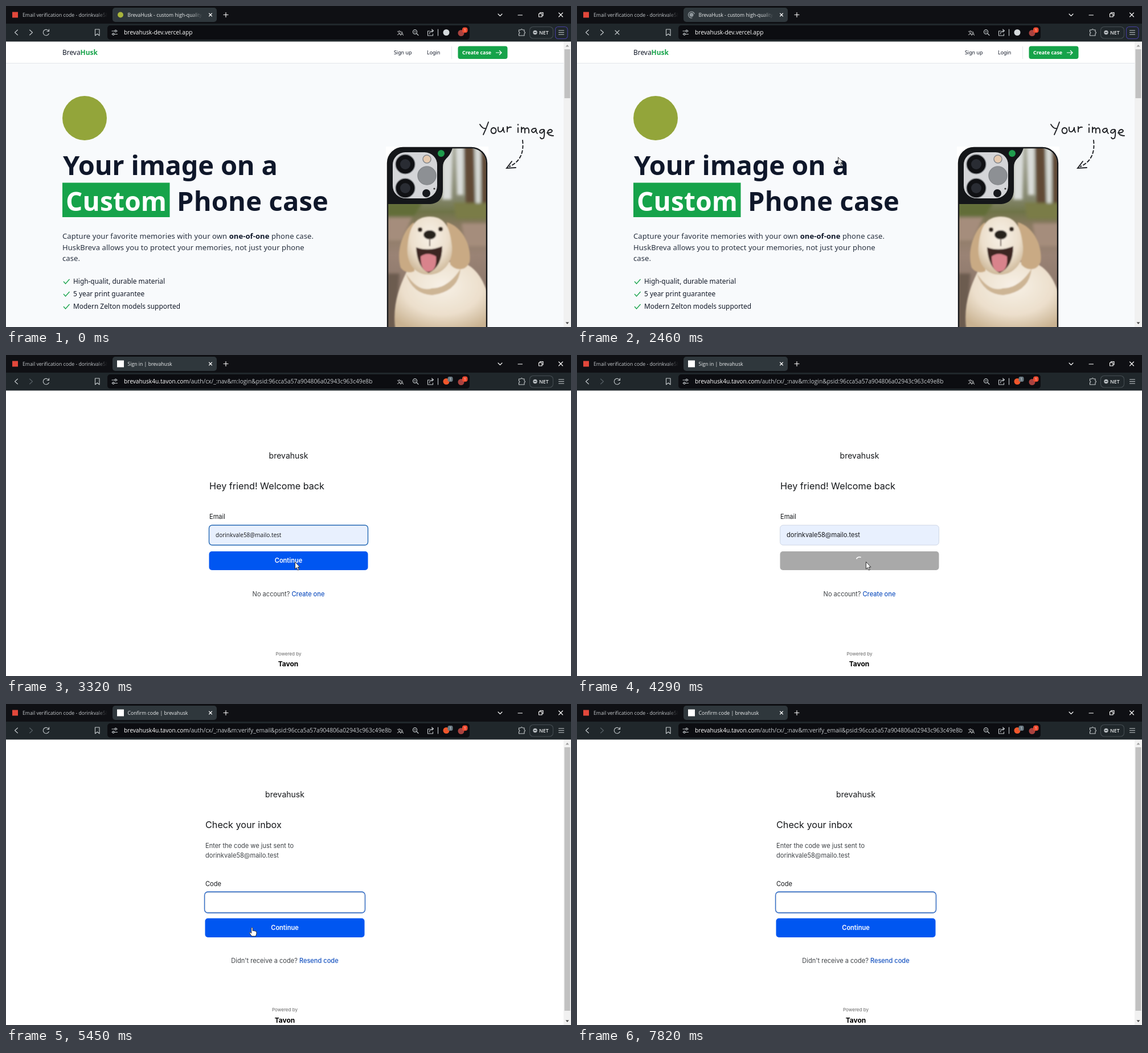
Write an HTML page that moves like this. It is 992x564 px and loops after 7990 ms.

```html
<!DOCTYPE html>
<html lang="en">
<head>
<meta charset="utf-8">
<title>Sign-in walkthrough</title>
<style>
html, body { margin: 0; width: 100%; height: 100%; overflow: hidden; background: #fff; }
svg { display: block; }
text { white-space: pre; }
.ui { font-family: "Open Sans", "Noto Sans", sans-serif; font-size: 8.7px; fill: #eceeef; }
.url { font-size: 10.2px; fill: #fff; }
.dim { fill: #c6cacd; }
.icon { fill: none; stroke: #c6cbce; stroke-width: 1.1; stroke-linecap: round; stroke-linejoin: round; }
.shop { font-family: "Noto Sans", sans-serif; font-size: 11.9px; fill: #111827; }
.big { font-size: 47px; font-weight: 700; letter-spacing: -.2px; fill: #0f172a; }
.lead { font-size: 13px; letter-spacing: .08px; fill: #27303f; }
.nav { font-size: 8.9px; }
.form { font-family: Inter, sans-serif; font-size: 11.05px; fill: #15171a; }
.form .mid { text-anchor: middle; }
.form .head { font-size: 16.2px; }
.form .soft { fill: #3f4347; }
.form .link { fill: #1552c0; font-weight: 500; }
.form .cta { fill: #fff; font-weight: 600; }
.form .tiny { font-size: 8.1px; fill: #666; }
.form .maker { font-size: 12px; font-weight: 700; fill: #000; }
</style>
</head>
<body>
<svg width="992" height="564" viewBox="0 0 992 564">
  <defs>
    <linearGradient id="fade1"><stop stop-color="#0f1014" stop-opacity="0"/><stop offset="1" stop-color="#0f1014"/></linearGradient>
    <linearGradient id="fade2"><stop stop-color="#2f373c" stop-opacity="0"/><stop offset="1" stop-color="#2f373c"/></linearGradient>
    <linearGradient id="wood" x2="0" y2="1">
      <stop stop-color="#a9aa9c"/><stop offset=".28" stop-color="#85876f"/><stop offset=".36" stop-color="#6f7448"/>
      <stop offset=".44" stop-color="#8b7a63"/><stop offset=".6" stop-color="#9a8375"/><stop offset="1" stop-color="#7c6a5e"/>
    </linearGradient>
    <radialGradient id="fur" cx=".5" cy=".35" r=".7">
      <stop stop-color="#f7f0e6"/><stop offset=".6" stop-color="#ecdfcc"/><stop offset="1" stop-color="#c9b291"/>
    </radialGradient>
    <clipPath id="case"><path d="M671 570V276a26 26 0 0 1 26-26h120a26 26 0 0 1 26 26V570z"/></clipPath>
    <filter id="blur"><feGaussianBlur stdDeviation="2.500"/></filter>
    <filter id="soft"><feGaussianBlur stdDeviation="1"/></filter>
  </defs>

  <rect y="62" width="992" height="502" fill="#fff"/>

  <!-- shop page -->
  <g id="shop" class="shop">
    <rect y="101" width="979" height="463" fill="#f8fafc"/>
    <path d="M0 100.5H979M782.5 71V93" stroke="#e3e6ea"/>
    <text x="99" y="85.500" font-weight="500">Breva<tspan font-weight="700" fill="#16a34a">Husk</tspan></text>
    <text class="nav" x="681" y="84.500">Sign up</text>
    <text class="nav" x="739" y="84.500">Login</text>
    <rect x="793.500" y="70.500" width="87" height="22.500" rx="4" fill="#16a34a"/>
    <text class="nav" x="801" y="84.500" style="fill:#fff;font-weight:600">Create case</text>
    <path d="M860 82h10m-4-4 4 4-4 4" fill="none" stroke="#fff" stroke-width="1.200"/>

    <circle cx="138" cy="197" r="39" fill="#93a53a"/>
    <text class="big" x="100" y="297">Your image on a</text>
    <rect x="99" y="310.500" width="188.500" height="60.500" fill="#16a34a"/>
    <text class="big" x="105" y="360" style="fill:#fff;font-size:46px;letter-spacing:.2px">Custom</text>
    <text class="big" x="300" y="360" style="letter-spacing:.2px">Phone case</text>
    <text class="lead" x="99" y="408.500">Capture your favorite memories with your own <tspan font-weight="600" fill="#0f172a">one-of-one</tspan> phone case.</text>
    <text class="lead" x="99" y="428.500">HuskBreva allows you to protect your memories, not just your phone</text>
    <text class="lead" x="99" y="448">case.</text>
    <path d="M101 484l3.500 4 7-8M101 506l3.500 4 7-8M101 528l3.500 4 7-8" fill="none" stroke="#16a34a" stroke-width="1.300"/>
    <text x="118" y="487.500">High-qualit, durable material</text>
    <text x="118" y="509.500">5 year print guarantee</text>
    <text x="118" y="531.500">Modern Zelton models supported</text>

    <rect x="667" y="247" width="180" height="317" fill="#fff"/>
    <g clip-path="url(#case)">
      <rect x="669" y="248" width="178" height="316" fill="url(#wood)"/>
      <g filter="url(#blur)">
        <path d="M766 248h18l-2 92h-16zM790 248h13v84h-11zM824 248h9v98h-8z" fill="#d9dcd9"/>
        <path d="M804 246h17l3 124h-16zM834 246h12v120h-10z" fill="#614936"/>
        <path d="M669 346h62l-14 22h-48z" fill="#626d37"/>
        <path d="M786 346h60v28h-56z" fill="#7a7c46"/>
        <path d="M669 372h44l-18 40h-26zM800 382h46v40h-40z" fill="#a58d7c"/>
        <path d="M669 470h22l-8 100h-14z" fill="#6c5b50"/>
      </g>
      <g filter="url(#soft)">
        <path d="M684 570C676 520 696 480 712 450h88c30 10 42 40 50 70v50z" fill="url(#fur)"/>
        <path d="M702 470q22 34 46 26 28 0 50-34-4 40-50 46-34-2-46-38z" fill="#cdb595"/>
        <path d="M716 380C698 392 684 430 693 460q10 12 24 6zM774 380c28 8 44 42 40 70-8 18-26 14-34 4z" fill="#c9aa84"/>
        <path d="M744 370c28 0 36 22 39 52 2 30-16 50-41 50s-40-22-37-50c3-32 12-52 39-52z" fill="url(#fur)"/>
        <path d="M720 424q22 8 46-2 0 36-24 47-20-10-22-45z" fill="#3d2623"/>
        <path d="M728 440q12-9 27 0 2 26-14 27-13-2-13-27z" fill="#d9838c"/>
        <ellipse cx="744" cy="402" rx="11" ry="8" fill="#28211f"/>
        <path d="M744 408v14" stroke="#5d4a40" stroke-width="2"/>
        <circle cx="727" cy="393" r="4" fill="#33251d"/><circle cx="763" cy="392" r="4" fill="#33251d"/>
      </g>
    </g>
    <path d="M670 570V276a27 27 0 0 1 27-27h120a27 27 0 0 1 27 27V570" fill="none" stroke="#15171a" stroke-width="2.400"/>
    <path d="M670 348V276a27 27 0 0 1 27-27h87q-3 12-11 19-6 6-6 15v39q0 26-26 26z" fill="#141619"/>
    <rect x="679" y="257" width="78" height="81" rx="22" fill="#d4d5d8"/>
    <g stroke="#85888c" stroke-width="1.500">
      <circle cx="701" cy="278" r="17" fill="#101114"/><circle cx="701" cy="320" r="17" fill="#101114"/>
      <circle cx="739" cy="298" r="16" fill="#8d9094"/><circle cx="739" cy="269" r="7" fill="#e5c9ae"/>
    </g>
    <g fill="#292c33"><circle cx="701" cy="278" r="9"/><circle cx="701" cy="320" r="9"/></g>
    <circle cx="738" cy="329" r="7" fill="#17191d"/><circle cx="752" cy="321" r="1.600" fill="#333"/>
    <circle cx="764" cy="259" r="6" fill="#1f9d4d"/>

    <g fill="none" stroke="#202226" stroke-width="1.900" stroke-linecap="round">
      <path d="M832 208q5 8 9 7M847 204q-4 12-9 22M856 214a4.500 5 0 1 0 .1 0M864 213q-1 9 4 8 4-1 5-8 0 6 2 9M880 212v9m0-5q3-4 7-3"/>
      <path d="M899 214v8m0-14v1M905 222v-9m0 4q4-6 6 0v6m0-6q5-6 7 1v5M930 215q-8 0-7 5 4 6 8-4-1 6 2 8"/>
      <path d="M944 217q-7-1-7 5 5 4 8-5 1 9-1 15-4 3-6-1M950 223q9 0 9-4-3-4-7 0-4 8 9 9"/>
      <path d="M907 236Q911 270 884 282" stroke-dasharray="5 4"/><path d="M888 273l-9 12 16-1"/>
    </g>
  </g>

  <!-- sign-in page -->
  <g id="login" class="form">
    <text class="mid" x="496" y="182" style="font-size:14px">brevahusk</text>
    <text class="head" x="357" y="236">Hey friend! Welcome back</text>
    <text x="357" y="288">Email</text>
    <rect id="field" x="356.500" y="299" width="279" height="35" rx="5.500"/>
    <text id="mail" x="368" y="320">dorinkvale58@mailo.test</text>
    <path id="caret1" d="M368.500 311V322" stroke="#111"/>
    <rect id="button" x="356.500" y="345" width="279" height="33" rx="5"/>
    <text id="go" class="mid cta" x="496" y="365">Continue</text>
    <path id="spin" d="M490 361a6 6 0 0 1 6-6" fill="none" stroke="#fff" stroke-width="1.600"/>
    <text class="mid soft" x="496" y="424">No account? <tspan class="link">Create one</tspan></text>
    <text class="mid tiny" x="496" y="527.500">Powered by</text>
    <text class="mid maker" x="495.500" y="546.500">Tavon</text>
  </g>

  <!-- code page -->
  <g id="code" class="form">
    <text class="mid" x="489.500" y="163.500" style="font-size:14px">brevahusk</text>
    <text class="head" x="350" y="217.500">Check your inbox</text>
    <text class="soft" x="350" y="253">Enter the code we just sent to</text>
    <text class="soft" x="350" y="270">dorinkvale58@mailo.test</text>
    <text x="350" y="320">Code</text>
    <rect x="348.500" y="330" width="282" height="37" rx="6" fill="#fff" stroke="#1f5fc0" stroke-width="1.300"/>
    <rect x="350" y="331.500" width="279" height="34" rx="5" fill="none" stroke="#d3d7de" stroke-width=".8"/>
    <path id="caret2" d="M362.500 342.500V354" stroke="#111"/>
    <rect x="349.500" y="376.500" width="280" height="33.500" rx="5" fill="#0056f1"/>
    <text class="mid cta" x="489.500" y="397">Continue</text>
    <text class="mid soft" x="489.500" y="455">Didn't receive a code? <tspan class="link">Resend code</tspan></text>
    <text class="mid tiny" x="489.500" y="540">Powered by</text>
    <text class="mid maker" x="489.500" y="559.500">Tavon</text>
  </g>

  <g id="bar">
    <rect x="979" y="62" width="13" height="502" fill="#f1f1f1"/>
    <rect id="thumb" x="980.500" y="76" width="10" height="86" fill="#c1c1c1"/>
    <path d="M982.500 71.500h6l-3-3.500z" fill="#999"/><path d="M982.500 555.500h6l-3 3.500z" fill="#444"/>
  </g>

  <!-- browser frame -->
  <g class="ui">
    <rect width="992" height="31" fill="#0f1014"/>
    <rect y="31" width="992" height="31.500" fill="#20272b"/>
    <rect x="187" y="3" width="183" height="25" rx="5" fill="#2f373c"/>
    <rect x="178" y="34" width="636" height="25" rx="5" fill="#0c0d11"/>
    <rect x="11" y="10.500" width="10" height="10" fill="#e2483b"/>
    <text x="29" y="18.500" class="dim">Email verification code - dorinkvale58</text>
    <rect x="158" y="8" width="20" height="16" fill="url(#fade1)"/><rect x="178" y="8" width="9" height="16" fill="#0f1014"/>
    <circle id="favShop" cx="201" cy="15.500" r="5" fill="#a8b43c"/>
    <g id="favLoad" fill="none"><circle cx="201" cy="15.500" r="3.500" fill="#8f979c"/><path id="ring" d="M201 10a5.500 5.500 0 1 1-5.500 5.500" stroke="#a9b0b5"/></g>
    <rect id="favForm" x="195" y="9.500" width="12" height="12" fill="#fff"/>
    <text id="title" x="213.500" y="18.500"></text>
    <rect x="325" y="8" width="20" height="16" fill="url(#fade2)"/><rect x="345" y="8" width="8" height="16" fill="#2f373c"/>

    <g class="icon">
      <path stroke="#fff" d="M356.500 13l5 5m0-5-5 5M382 15.500h8m-4-4v8M864 14l3.500 3.500L871 14M899 16h7.500M935.500 13.500h5.500v5.500h-5.500zM937.500 13.500v-2h5.500v5.500h-2M970.500 12l7 7m0-7-7 7"/>
      <path d="M20.500 42l-5 4.500 5 4.500"/>
      <path id="fwd" d="M41.500 42l5 4.500-5 4.500"/>
      <path id="reload" d="M75 44a5.200 5.200 0 1 0 .3 4.500M75.500 41v3.500H72"/>
      <path id="stop" d="M67 43l7 7m0-7-7 7"/>
      <path d="M156.500 41h7.500v11l-3.700-3-3.800 3zM186 44h4m5 0h.5M186 49.500h.5m4 0h5"/>
      <circle cx="192.500" cy="44" r="1.600"/><circle cx="188.500" cy="49.500" r="1.600"/>
      <circle cx="718" cy="45.500" r="3.600"/><path d="M721 48.500l3 3M716.500 45.500h3M758.500 41v11"/>
      <path d="M744 44h-3.500v8h9v-3M743.500 49q.5-5 6.500-5.500m-2.500-2.500 3 2.500-3 2.500"/>
      <path d="M900.500 42h3.500q1-3 3 0h3v3.500q3 1 0 3V52h-9.500v-3.500q3-1.500 0-3z"/>
      <rect x="919.500" y="36.500" width="41" height="20.500" rx="6" stroke="#444c51"/>
      <path d="M970.500 43h9m-9 3.500h9m-9 3.500h9"/>
      <rect id="menu" x="964.500" y="36.500" width="21.500" height="21" rx="5" stroke="#463fa0"/>
    </g>
    <g id="lang"><text x="686.500" y="49.500" style="font-family:'Noto Sans CJK SC','Noto Sans CJK JP',sans-serif;font-size:8px">文</text><text x="692.500" y="52" style="font-size:8.500px">A</text></g>
    <circle id="shield" cx="773" cy="46.500" r="5.500"/>
    <g id="count"><rect x="775.500" y="38" width="9" height="9" rx="3" fill="#687780"/><text x="778.200" y="45" style="font-size:6.500px">1</text></g>
    <circle cx="799" cy="47.500" r="5.500" fill="#a8423f"/>
    <rect x="801" y="37.500" width="9.500" height="9.500" rx="4" fill="#ee4b31"/><text x="804" y="45" style="font-size:6.500px;fill:#fff">1</text>
    <circle cx="929" cy="46.500" r="3.700" fill="#b7bcc0"/><path d="M927 46.500h4" stroke="#20272b"/>
    <text x="936" y="49.700" style="font-weight:600">NET</text>
    <text class="url" x="207" y="50.300"><tspan id="host"></tspan><tspan id="path" class="dim"></tspan></text>
  </g>

  <g id="cursor" stroke="#222" stroke-width=".9" fill="#fff" stroke-linejoin="round">
    <path id="arrow" d="M.5.500V13l2.800-2.600 2 4.700 2-.9-2-4.500h3.700z"/>
    <path id="hand" d="M-1.200 1.500q1.200-2 2.400 0V6.500l1.500-.3 1.800.6 1.700.4q1.700 0 1.700 2v2.300l-1.300 4.500H-.5L-4.300 10.500q0-2 1.600-1.200l1.500 1.400z"/>
  </g>
</svg>
<script>
const LOOP = 7990, OPEN = 2540, READY = 2900, CODE = 4800;
const $ = id => document.getElementById(id);
const show = (id, on) => $(id).style.display = on ? "" : "none";
const within = (v, a, b) => v >= a && v < b;
const put = (id, attrs) => { for (const k in attrs) $(id).setAttribute(k, attrs[k]); };

// pointer path: time, x, y
const path = [
  [170, 560, 560], [950, 617, 150], [1420, 769, 97], [1570, 750, 82], [1730, 750, 82],
  [2100, 620, 300], [2540, 443, 262], [3080, 507, 363], [4290, 507, 363], [4700, 540, 330],
  [5080, 672, 182], [5250, 540, 290], [5450, 432, 392], [5560, 288, 420], [5740, 420, 490],
  [5910, 572, 516], [6380, 583, 530], [6980, 583, 530], [7270, 305, 325], [7510, 305, 325], [7750, 386, 325]
];

function pointer(t) {
  const i = path.findIndex(p => p[0] > t);
  if (i < 1) return path[i < 0 ? path.length - 1 : 0].slice(1);
  const a = path[i - 1], b = path[i], k = (t - a[0]) / (b[0] - a[0]);
  const s = k * k * (3 - 2 * k);
  return [a[1] + (b[1] - a[1]) * s, a[2] + (b[2] - a[2]) * s];
}

function drawFrame(t, page) {
  const settled = !within(t, OPEN, READY);
  const loading = within(t, 1730, READY) || within(t, 4450, CODE);
  $("title").textContent = { shop: "BrevaHusk - custom high-quality", login: "Sign in | brevahusk", code: "Confirm code | brevahusk" }[page];
  $("host").textContent = page == "shop" ? "brevahusk-dev.vercel.app" : "brevahusk4u.tavon.com";
  $("path").textContent = page == "shop" ? "" :
    `/auth/cx/_:nav&m:${page == "login" ? "login" : "verify_email"}&psid:96cca5a57a904806a02943c963c49e8b`;
  show("favLoad", loading);
  show("favShop", page == "shop" && !loading);
  show("favForm", page != "shop" && !loading);
  put("ring", { transform: `rotate(${t * .36} 201 15.5)` });
  show("reload", !loading);
  show("stop", loading);
  show("lang", settled);
  show("count", t >= READY);
  show("menu", page == "shop");
  put("shield", { fill: page == "shop" ? "#d5d9dc" : "#f0562b" });
  put("fwd", { stroke: page == "shop" ? "#c6cbce" : "#596167" });
}

function drawLogin(t) {
  const filled = t >= 3320, sent = t >= 4050;
  put("field", { fill: filled ? "#e8f0fe" : "#fff", stroke: sent ? "#cbd3e2" : "#2468b4", "stroke-width": sent ? .9 : 1.4 });
  show("mail", filled);
  // the suggestion is previewed in the system font before it is accepted
  put("mail", { style: t < 3730 ? "font-family:'Open Sans',sans-serif;font-size:10px" : "" });
  show("mail", filled);
  show("caret1", t < 3060 || within(t, 3560, 3730));
  put("button", { fill: sent ? "#a9a9a9" : "#0056f1" });
  show("go", !sent);
  show("spin", sent);
  put("spin", { transform: `rotate(${(t - 4290) * .45 + 25} 496 361)` });
}

function drawPointer(t, page) {
  const [x, y] = pointer(t);
  const hand = page == "shop" ? within(t, 1500, 1850)
    : page == "login" ? within(t, 3900, 4050)
    : within(x, 350, 630) && within(y, 377, 410);
  show("cursor", within(t, 170, 7820));
  put("cursor", { transform: `translate(${x} ${y})` });
  show("hand", hand);
  show("arrow", !hand);
}

function draw(now) {
  const t = now % LOOP;
  const page = t < OPEN ? "shop" : t < CODE ? "login" : "code";
  for (const p of ["shop", "login", "code"]) show(p, p == page);
  show("bar", page != "login");
  put("thumb", { height: page == "shop" ? 86 : 463 });
  show("caret2", t < 5200 || within(t, 5730, 6260) || within(t, 6790, 7510));
  drawFrame(t, page);
  drawLogin(t);
  drawPointer(t, page);
}

const start = performance.now();
function tick() {
  draw(performance.now() - start);
  requestAnimationFrame(tick);
}
tick();
</script>
</body>
</html>
```
